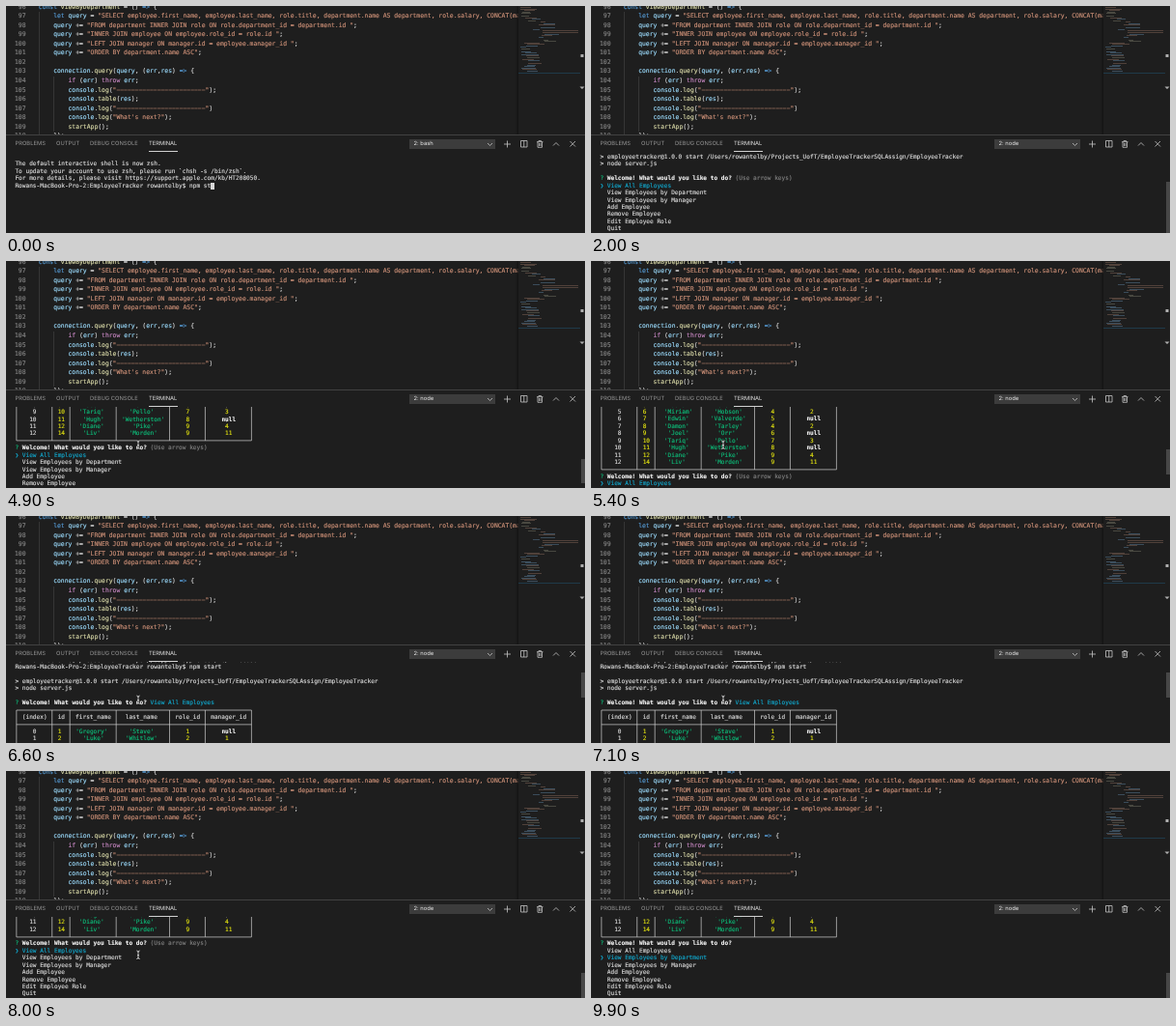
Recreate the animation shown at these times as an HTML page. Size 600x235 px, loop 10000 ms.

```html
<!DOCTYPE html>
<html lang="en">
<head>
<meta charset="utf-8">
<title>Employee tracker terminal</title>
<style>
html, body { margin: 0; width: 600px; height: 235px; overflow: hidden; background: #1e1e1e; }
body { position: relative; text-rendering: geometricPrecision; color: #d4d4d4; }
div, svg { position: absolute; }
.mono { font-family: "DejaVu Sans Mono", monospace; white-space: pre; -webkit-text-stroke: .14px currentColor; }
#editor { left: 0; top: 0; width: 531px; height: 133px; overflow: hidden; font-size: 6.38px; line-height: 9.53px; }
#editor .num { left: 0; width: 20.5px; text-align: right; color: #858585; }
#editor .code { left: 33.8px; }
.guide { width: .6px; background: #363636; }
#map { left: 531px; top: 0; width: 69px; height: 133px; box-shadow: -1px 0 2px #111; }
#panel { left: 0; top: 133px; width: 600px; height: 102px; background: #1e1e1e; border-top: 1px solid #414141; box-sizing: border-box; }
.tab, #shell { font: 5.8px/8px Inter, "Open Sans", sans-serif; white-space: pre; }
.tab { top: 139px; color: #969696; }
.tab.on { color: #e7e7e7; }
#line { left: 148px; top: 150px; width: 29.5px; height: 1px; background: #d0d0d0; }
#shell { left: 417.5px; top: 138px; width: 84px; height: 10px; line-height: 10px; padding-left: 5px; background: #3c3c3c; color: #f0f0f0; }
#term { left: 0; top: 151px; width: 600px; height: 84px; overflow: hidden; font-size: 6.13px; line-height: 7.43px; color: #dcdcdc; }
#page { left: 9.4px; }
#rows { left: 0; top: 0; }
#grid { left: 0; top: 0; overflow: visible; }
#thumb { left: 595.5px; width: 4.5px; background: #474747; }
#icons, #mouse { left: 0; top: 0; }
b { color: #f2f2f2; }
.g { color: #0dbc79; } .y { color: #e5e510; } .c { color: #11a8cd; } .d { color: #808080; }
.cur { background: #d8d8d8; }
.ptr { display: inline-block; width: 1ch; }
</style>
</head>
<body>
<div id="editor" class="mono"></div>
<div id="map"></div>
<div id="panel"></div>
<div class="tab" style="left:9.5px">PROBLEMS</div>
<div class="tab" style="left:52px">OUTPUT</div>
<div class="tab" style="left:87px">DEBUG CONSOLE</div>
<div class="tab on" style="left:148px">TERMINAL</div>
<div id="line"></div>
<div id="shell"></div>
<div id="term" class="mono">
  <div id="page"><div id="rows"></div><svg id="grid" width="260" height="260" fill="none" stroke="#d0d0d0" stroke-width=".7"><path/></svg></div>
  <div id="thumb"></div>
</div>
<svg id="icons" width="600" height="235" fill="none" stroke="#c5c5c5" stroke-width=".8">
  <path d="M499 142l2.5 2.5 2.5-2.5"/>
  <path d="M516 143h7M519.5 139.5v7"/>
  <path d="M533.5 139.5h6.5v6.5h-6.5zM536.75 139.5v6.5"/>
  <path d="M550 140.7h6.5M552 140.7v-1.2h2.5v1.2M551 140.7v5.6h4.5v-5.6M552.6 142v3M554 142v3"/>
  <path d="M567 144.5l3-3 3 3"/>
  <path d="M584.5 140l5.5 5.5M590 140l-5.5 5.5"/>
  <path d="M595.5 50h3v3h-3zM594.5 83.5h5l-2.5 2.5z" fill="#b0b0b0" stroke="none"/>
</svg>
<svg id="mouse" width="600" height="235" fill="none">
  <defs><path id="beam" d="M135.3 186q1.7 0 1.7 1.4q0-1.4 1.7-1.4M137 187v6.5M135.3 194.6q1.7 0 1.7-1.4q0 1.4 1.7 1.4M136 190.8h2"/></defs>
  <use href="#beam" stroke="#000" stroke-width="1.6"/>
  <use href="#beam" stroke="#fff" stroke-width=".8"/>
</svg>
<script>
const $ = id => document.getElementById(id);
const LOOP = 10000, ROW = 7.43, CH = 6.13 * .602, VIEW = 11, TOP = 1.9;

// Editor
const dashes = '−'.repeat(24);
const code = [
  'const viewByDepartment = () => {',
  '    let query = "SELECT employee.first_name, employee.last_name, role.title, department.name AS department, role.salary, CONCAT(ma',
  '    query += "FROM department INNER JOIN role ON role.department_id = department.id ";',
  '    query += "INNER JOIN employee ON employee.role_id = role.id ";',
  '    query += "LEFT JOIN manager ON manager.id = employee.manager_id ";',
  '    query += "ORDER BY department.name ASC";',
  '',
  '    connection.query(query, (err,res) => {',
  '        if (err) throw err;',
  `        console.log("${dashes}");`,
  '        console.table(res);',
  `        console.log("${dashes}")`,
  '        console.log("What\'s next?");',
  '        startApp();',
  '    });'
];
const paint = (s, color) => `<span style="color:${color}">${s.replace(/>/g, '&gt;')}</span>`;
function highlight(line) {
  return line.replace(/"[^"]*"?|=>|[A-Za-z_]\w*/g, (word, at) => {
    if (word[0] === '"') return paint(word, '#ce9178');
    if (/^(const|let|=>)$/.test(word)) return paint(word, '#569cd6');
    if (/^(if|throw)$/.test(word)) return paint(word, '#c586c0');
    const call = line[at + word.length] === '(' || word === 'viewByDepartment';
    return paint(word, call ? '#dcdcaa' : '#9cdcfe');
  });
}
const lineY = i => 1.5 + 9.53 * i - 4.76;
const guide = (x, from, to) =>
  `<div class="guide" style="left:${x}px;top:${lineY(from)}px;height:${9.53 * (to - from)}px"></div>`;
$('editor').innerHTML = guide(34, 1, 15) + guide(49.3, 8, 14) + code.map((line, i) =>
  `<div class="num" style="top:${lineY(i)}px">${96 + i}</div>` +
  `<div class="code" style="top:${lineY(i)}px">${highlight(line)}</div>`).join('');

// Minimap: seeded strokes, deeper indents in the middle block, two long rows
let seed = 11;
const rand = () => (seed = seed * 16807 % 2147483647) / 2147483647;
const tints = ['#3d5060', '#50413a', '#484840', '#3a4c5a'];
const stroke = (x, y, w, color) =>
  `<div style="left:${x}px;top:${y}px;width:${w}px;height:.8px;background:${color}"></div>`;
let strokes = stroke(0, 68.5, 64, '#1f3a4a');
for (let i = 0; i < 44; i++) {
  const long = i === 16 || i === 17;
  const deep = i > 7 && i < 24;
  const x = long ? 25 : (deep ? 10 + rand() * 18 : 2 + rand() * 8);
  const w = long ? 37 : 5 + rand() * 13;
  if (i % 8 !== 5) strokes += stroke(x, 1 + i * 1.53, w, long ? tints[1] : tints[Math.floor(rand() * 4)]);
}
$('map').innerHTML = strokes;

// Terminal
const people = [
  ['Gregory', 'Stave', 1, 1, null], ['Luke', 'Whitlow', 2, 2, 1],
  ['Clara', 'Fenwood', 3, 3, 1], ['Owen', 'Harl', 4, 3, 1], ['Nadia', 'Crewe', 5, 4, 2],
  ['Miriam', 'Hobson', 6, 4, 2], ['Edwin', 'Valverde', 7, 5, null],
  ['Damon', 'Tarley', 8, 4, 2], ['Joel', 'Orr', 9, 6, null],
  ['Tariq', 'Pello', 10, 7, 3], ['Hugh', 'Wetherston', 11, 8, null],
  ['Diane', 'Pike', 12, 9, 4], ['Liv', 'Morden', 14, 9, 11]
];
const widths = [9, 4, 12, 14, 9, 12];
const span = (cls, s) => `<span class="${cls}">${s}</span>`;
function tableRow(values, plain) {
  return ' ' + values.map((v, i) => {
    const s = !plain && typeof v === 'string' ? `'${v}'` : String(v);
    const left = (widths[i] - s.length) >> 1;
    const body = plain || i === 0 ? s : v === null ? `<b>${s}</b>` : span(s[0] === "'" ? 'g' : 'y', s);
    return ' '.repeat(left) + body + ' '.repeat(widths[i] - s.length - left);
  }).join(' ');
}
const table = ['', tableRow(['(index)', 'id', 'first_name', 'last_name', 'role_id', 'manager_id'], true), '',
  ...people.map(([first, last, id, role, boss], i) => tableRow([i, id, first, last, role, boss])), ''];

const intro = ['', 'The default interactive shell is now zsh.',
  'To update your account to use zsh, please run `chsh -s /bin/zsh`.',
  'For more details, please visit https://support.apple.com/kb/HT208050.'];
const prompt = 'Rowans-MacBook-Pro-2:EmployeeTracker rowantelby$ ';
const started = ['', '&gt; employeetracker@1.0.0 start /Users/rowantelby/Projects_UofT/EmployeeTrackerSQLAssign/EmployeeTracker',
  '&gt; node server.js', ''];
const options = ['View All Employees', 'View Employees by Department', 'View Employees by Manager',
  'Add Employee', 'Remove Employee', 'Edit Employee Role', 'Quit'];
const ask = tail => `${span('g', '?')} <b>Welcome! What would you like to do?</b> ${tail}`;
const menu = (pick, hint) => [ask(hint ? span('d', '(Use arrow keys)') : ''),
  ...options.map((o, i) => i === pick ? span('c', span('ptr', '❯') + ' ' + o) : '  ' + o)];
const caret = span('cur', ' ');

// Table rules, in character cells
let rules = '', edge = 0;
const cx = c => (c + .5) * CH, cy = r => (r + .5) * ROW;
for (const w of [-1, ...widths]) {
  edge += w + 1;
  rules += `M${cx(edge)} ${cy(10)}V${cy(26)}`;
}
for (const r of [10, 12, 26]) rules += `M${cx(0)} ${cy(r)}H${cx(edge)}`;
$('grid').firstChild.setAttribute('d', rules);

const T = { enter: 500, node: 800, menu: 1300, table: 3400, mouse: 4400, down: 9300 };
const scrollKeys = [[4600, 24], [5400, 18], [6600, 4], [7200, 4], [7950, 24]];

function scrollAt(t) {
  let [t0, v0] = scrollKeys[0];
  for (const [t1, v1] of scrollKeys) {
    if (t < t1) return t1 === t0 ? v0 : Math.round(v0 + (v1 - v0) * (t - t0) / (t1 - t0));
    [t0, v0] = [t1, v1];
  }
  return v0;
}
function bufferAt(t) {
  const typed = prompt + 'npm start'.slice(0, 6 + Math.floor(t / 100));
  if (t < T.enter) return [...intro, typed + caret];
  if (t < T.node) return [...intro, typed, caret];
  const head = [...intro, typed, ...started];
  if (t < T.menu) return [...head, caret];
  if (t < T.table) return [...head, ...menu(0, true)];
  const moved = t >= T.down;
  return [...head, ask(span('c', options[0])), ...table, ...menu(moved ? 1 : 0, !moved)];
}

let shown = '';
function draw(t) {
  const lines = bufferAt(t);
  const scroll = t < T.table ? Math.max(0, lines.length - VIEW) : scrollAt(t);
  const html = lines.map(s => s || ' ').join('\n');
  if (html !== shown) $('rows').innerHTML = shown = html;
  $('page').style.top = TOP - scroll * ROW + 'px';
  $('grid').style.display = t < T.table ? 'none' : '';
  $('shell').textContent = t < T.node ? '2: bash' : '2: node';
  const track = VIEW * ROW + .4;
  $('thumb').style.display = lines.length > VIEW ? '' : 'none';
  $('thumb').style.top = TOP + track * scroll / lines.length + 'px';
  $('thumb').style.height = track * VIEW / lines.length + 'px';
  $('mouse').style.display = t >= T.mouse && t < T.down ? '' : 'none';
}

const begin = performance.now();
function tick() {
  const t = (performance.now() - begin) % LOOP;
  draw(Math.floor(t / 100) * 100);
  requestAnimationFrame(tick);
}
tick();
</script>
</body>
</html>
```
